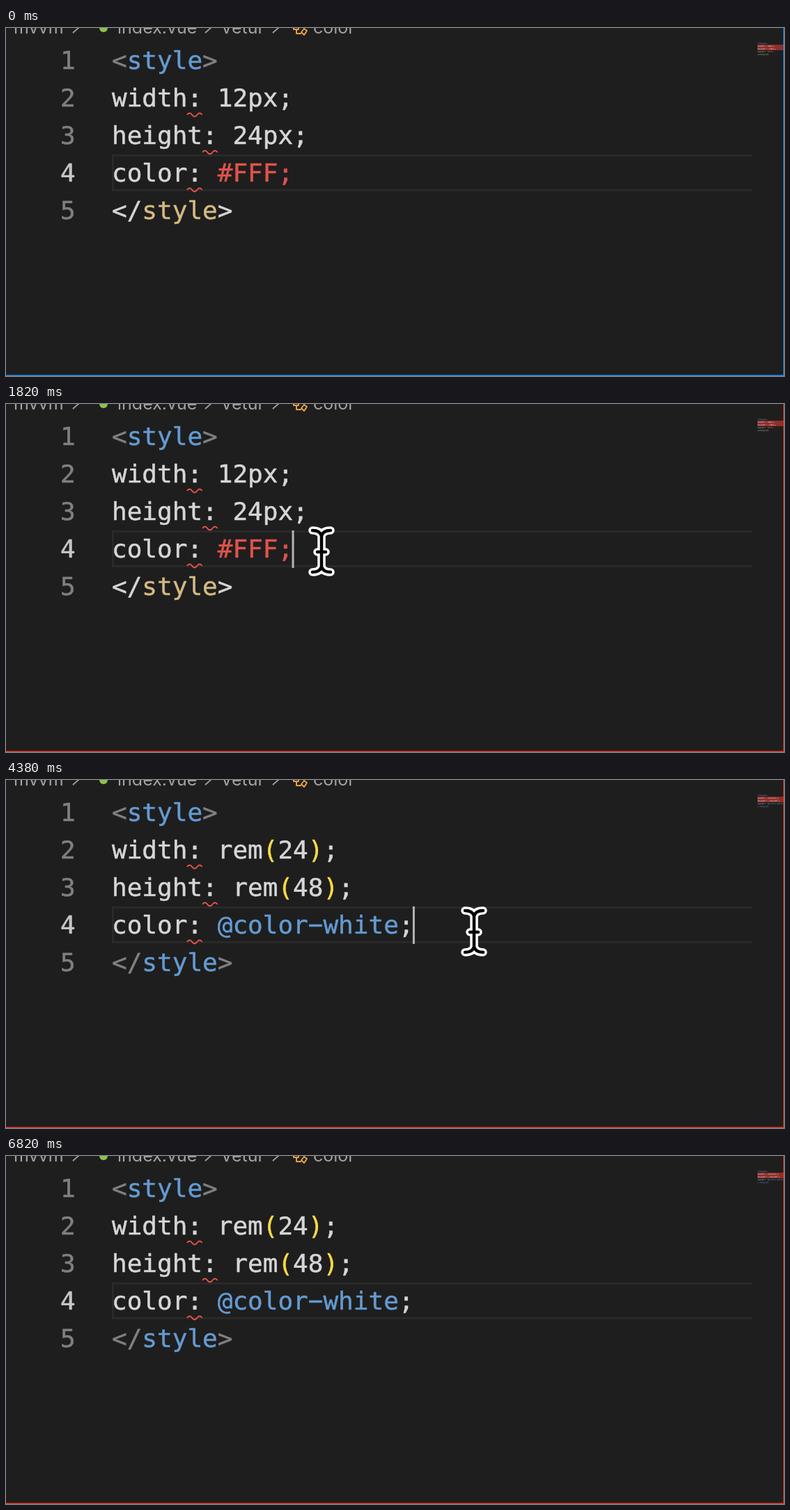
An HTML page for the animation above (6.86 s loop, 1117 by 501 pixels).

```html
<!DOCTYPE html>
<html lang="en">
<head>
<meta charset="utf-8">
<title>Editor</title>
<style>
html, body { margin: 0; height: 100%; overflow: hidden; background: #1e1e1e; }
svg { display: block; width: 100vw; height: 100vh; }
text { white-space: pre; }
.code { font: 36px "DejaVu Sans Mono", monospace; color: #d6d6d6; stroke-width: .5; }
.code text, .code tspan { fill: currentColor; stroke: currentColor; }
.path { font: 25px Inter, sans-serif; fill: #a2a2a2; }
.dim { color: #808080; }
.active { color: #c6c6c6; }
.blue { color: #649ad2; }
.red { color: #e1534c; }
.gold { color: #d4b981; }
.paren { color: #fddb45; }
.wave { fill: none; stroke: #e1534c; stroke-width: 2; }
.line { fill: none; stroke: #a2a2a2; stroke-width: 1.8; }
.field { fill: none; stroke: #e4a244; stroke-width: 2; stroke-linejoin: round; }
.beam { fill: none; stroke-linecap: round; stroke-linejoin: round; }
</style>
</head>
<body>
<svg viewBox="0 0 1117 501">
  <defs>
    <path id="wave" class="wave" d="M0 1q3.6 -5 7.2 0t7.2 0t7.2 0"/>
    <path id="chevron" class="line" d="M0 -11L10 -2L0 7"/>
    <path id="stem" d="M-13 -30Q-2 -30 0 -22Q2 -30 13 -30M0 -22V22M-13 30Q-2 30 0 22Q2 30 13 30M-6 1H6"/>
    <g id="codeA" class="code">
      <text x="152" y="59"><tspan class="dim">&lt;</tspan><tspan class="blue">style</tspan><tspan class="dim">&gt;</tspan></text>
      <text x="152" y="113">width: 12px;</text>
      <text x="152" y="167">height: 24px;</text>
      <text x="152" y="221">color: <tspan class="red">#FFF;</tspan></text>
      <text x="152" y="275">&lt;/<tspan class="gold">style</tspan>&gt;</text>
    </g>
    <g id="codeB" class="code">
      <text x="152" y="59"><tspan class="dim">&lt;</tspan><tspan class="blue">style</tspan><tspan class="dim">&gt;</tspan></text>
      <text x="152" y="113">width: rem<tspan class="paren">(</tspan>24<tspan class="paren">)</tspan>;</text>
      <text x="152" y="167">height: rem<tspan class="paren">(</tspan>48<tspan class="paren">)</tspan>;</text>
      <text x="152" y="221">color: <tspan class="blue">@color−white</tspan>;</text>
      <text x="152" y="275"><tspan class="dim">&lt;/</tspan><tspan class="blue">style</tspan><tspan class="dim">&gt;</tspan></text>
    </g>
  </defs>
  <rect width="1117" height="501" fill="#1e1e1e"/>

  <!-- breadcrumb -->
  <g class="path">
    <text x="11" y="7.5">mvvm</text>
    <text x="160" y="7.5">index.vue</text>
    <text x="308" y="7.5">Vetur</text>
    <text x="441" y="7.5">color</text>
  </g>
  <use href="#chevron" x="96"/>
  <use href="#chevron" x="286"/>
  <use href="#chevron" x="383"/>
  <circle cx="140" cy="0" r="6" fill="#8dc149"/>
  <path class="field" d="M413 -3V2H420V-3M417 2V8H424M424 6L428 1L432 4L428 10Z"/>

  <!-- current line and gutter -->
  <path d="M1071 183.5H153.5V233.5H1071" fill="none" stroke="#292929" stroke-width="3"/>
  <g class="code">
    <text class="dim" x="78" y="59">1</text>
    <text class="dim" x="78" y="113">2</text>
    <text class="dim" x="78" y="167">3</text>
    <text class="active" x="78" y="221">4</text>
    <text class="dim" x="78" y="275">5</text>
  </g>

  <rect x="1079" y="24" width="38" height="8" fill="#8f2e2a"/>
  <g id="before">
    <use href="#codeA"/>
    <use href="#codeA" transform="translate(1064.7 18.5) scale(.094 .074)"/>
  </g>
  <g id="after">
    <use href="#codeB"/>
    <use href="#codeB" transform="translate(1064.7 18.5) scale(.094 .074)"/>
  </g>
  <use href="#wave" x="260" y="124"/>
  <use href="#wave" x="282" y="178"/>
  <use href="#wave" x="260" y="232"/>
  <g id="stale">
    <use href="#wave" x="218" y="178"/>
    <use href="#wave" x="510" y="178"/>
  </g>

  <rect id="caret" y="182" width="3" height="54" fill="#b4b4b2"/>
  <path id="arrow" d="M2 5V56L15 44L23 69L33 65L23 42H41Z" stroke="#fff" stroke-width="4"/>
  <g id="ibeam" class="beam">
    <use href="#stem" stroke="#fff" stroke-width="11.5"/>
    <use href="#stem" stroke="#000" stroke-width="4.5"/>
  </g>
  <path id="frame" d="M1116 0h1v501H0v-1.5h1116z"/>
</svg>
<script>
const LOOP = 6860, STEP = 50, BLINK = 487;
const CHAR = 21.67, LEFT = 152;
const $ = id => document.getElementById(id);
const show = (id, on) => $(id).setAttribute('visibility', on ? 'visible' : 'hidden');

const easeOut = power => u => 1 - (1 - u) ** power;
const easeIn = u => u ** 3;
const smooth = u => u * u * (3 - 2 * u);

// Moves from a to b in hard steps; y may have its own easing.
function glide(t, start, end, a, b, easeX, easeY = easeX) {
  const passed = Math.floor((t - start) / STEP) * STEP;
  const u = Math.min(1, passed / (end - start));
  return [a[0] + (b[0] - a[0]) * easeX(u), a[1] + (b[1] - a[1]) * easeY(u)];
}

const entry = [246, 430], peak = [592, 150], text = [453, 212];
const far = [763, 212], rest = [672, 218], exit = [841, 454];

function pointer(t) {
  if (t < 470) return glide(t, 270, 470, entry, peak, easeOut(3), easeOut(2.3));
  if (t < 3520) return glide(t, 470, 760, peak, text, smooth);
  if (t < 3830) return glide(t, 3520, 3830, text, far, smooth);
  if (t < 5270) return glide(t, 3830, 4030, far, rest, smooth);
  return glide(t, 5270, 5400, rest, exit, easeIn);
}

// Each click or edit puts the caret after a column and restarts its blink.
function drawCaret(t) {
  const [since, column] = t < 3050 ? [810, 12] : t < 4380 ? [3050, 6] : [4380, 20];
  const beat = Math.floor((t - since) / BLINK);
  $('caret').setAttribute('x', LEFT + column * CHAR - 1.5);
  show('caret', t >= since && beat % 2 === 0);
}

function draw(t) {
  $('frame').setAttribute('fill', t < 50 ? '#2490f0' : '#e2402f');
  show('before', t < 3050);
  show('after', t >= 3050);
  show('stale', t >= 3050 && t < 3220);
  drawCaret(t);

  const move = `translate(${pointer(t).join(' ')})`;
  $('arrow').setAttribute('transform', move);
  $('ibeam').setAttribute('transform', move);
  show('arrow', t >= 270 && t < 570);
  show('ibeam', t >= 570 && t < 5450);
}

const begin = performance.now();
function tick() {
  // A small lead keeps hard changes from landing one refresh late.
  draw((performance.now() - begin + 2) % LOOP);
  requestAnimationFrame(tick);
}
tick();
</script>
</body>
</html>
```
